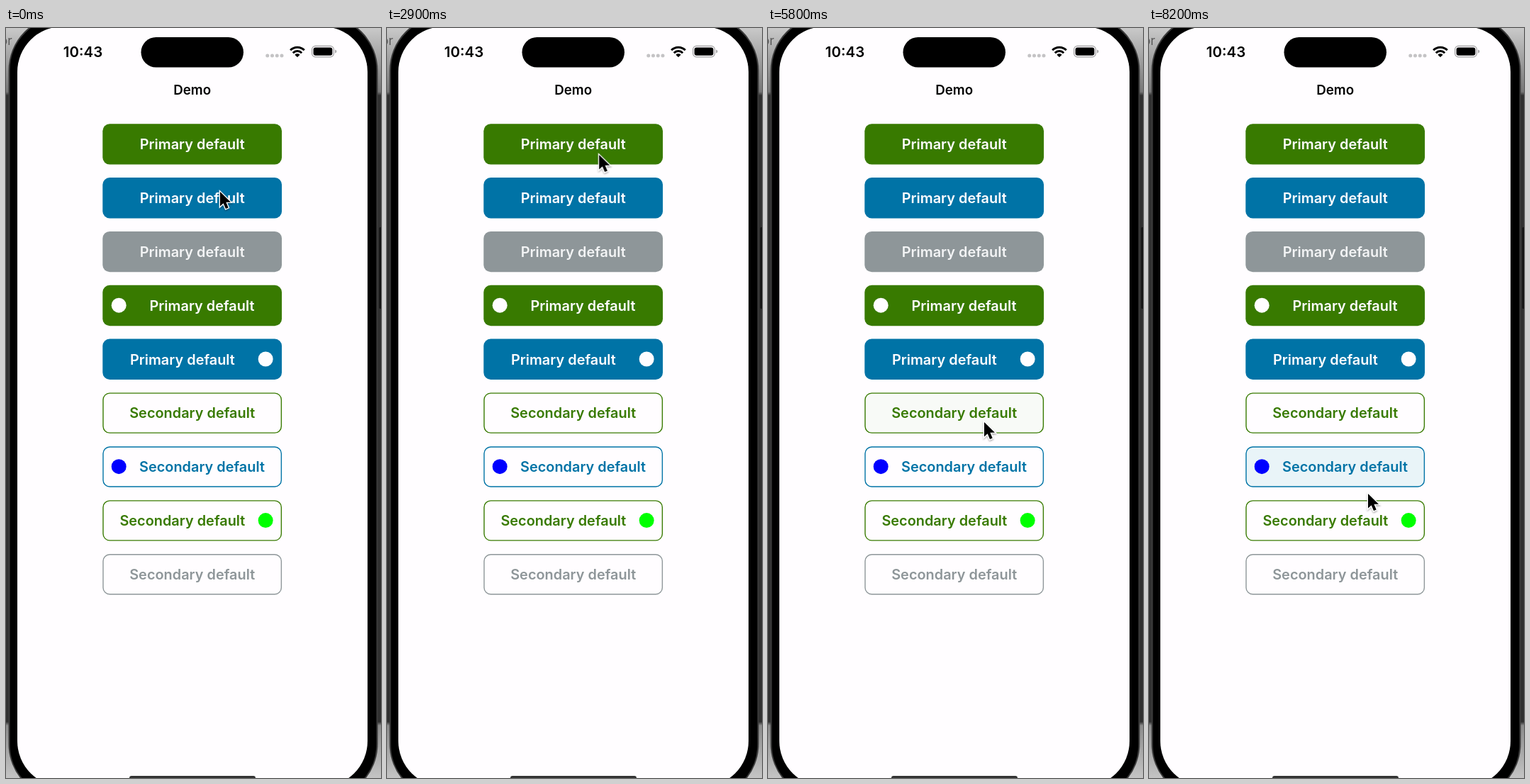
These frames come from a looping animation (529x1058 px, 8300 ms). An HTML page:

```html
<!DOCTYPE html>
<html lang="en">
<head>
<meta charset="utf-8">
<title>Demo</title>
<style>
html, body { margin: 0; width: 100%; height: 100%; overflow: hidden; background: #333; }
svg { display: block; width: 100%; height: 100%; }
text { font-family: Inter, "Open Sans", sans-serif; font-weight: 600; }
.label { font-size: 19.9px; text-anchor: middle; }
.press { opacity: 0; animation: press 8.3s linear infinite; }
.hold { opacity: 0; animation: hold 8.3s linear infinite; }
#cursor { animation: move 8.3s ease-in-out infinite; }

@keyframes press {
  0% { opacity: 0; }
  2.4%, 5.5% { opacity: 1; }
  8.4%, 100% { opacity: 0; }
}
@keyframes hold {
  0%, 90.4% { opacity: 0; }
  92.8%, 100% { opacity: 1; }
}
@keyframes move {
  0% { transform: translate(302px, 231px); }
  10.8%, 18.1% { transform: translate(302px, 243px); }
  25.3%, 33.7% { transform: translate(300px, 171px); }
  41%, 44.6% { transform: translate(287px, 305px); }
  50.6%, 54.2% { transform: translate(292px, 390px); }
  59%, 62.7% { transform: translate(298px, 470px); }
  68.7%, 74.7% { transform: translate(305px, 556px); }
  81.9%, 91.6% { transform: translate(310px, 624px); }
  97.6%, 100% { transform: translate(309px, 657px); }
}
</style>
</head>
<body>
<svg viewBox="0 0 529 1058" preserveAspectRatio="none">
  <defs>
    <linearGradient id="desk" x2="0" y2="1">
      <stop offset="0" stop-color="#c9c9c9"/>
      <stop offset=".085" stop-color="#777"/>
      <stop offset=".09" stop-color="#303030"/>
      <stop offset=".925" stop-color="#303030"/>
      <stop offset=".93" stop-color="#8c8c8c"/>
      <stop offset="1" stop-color="#c4c4c4"/>
    </linearGradient>
    <filter id="soft" x="-50%" y="-50%" width="200%" height="200%">
      <feDropShadow dx="0" dy="1.5" stdDeviation="1.3" flood-opacity=".35"/>
    </filter>
  </defs>

  <!-- phone body -->
  <rect width="529" height="1058" fill="url(#desk)"/>
  <text x="-8" y="24" font-size="17" style="font-weight:400" fill="#555">or</text>
  <rect x="526.5" y="281" width="4" height="115" rx="1.5" fill="#111"/>
  <rect x="4.5" y="-17" width="519" height="1104" rx="77" stroke="#3b3b3b" stroke-width="2"/>
  <rect x="16" y="-2" width="494" height="1072" rx="64" fill="#fffdff"/>

  <!-- status bar -->
  <rect x="190.5" y="13" width="144.5" height="42.5" rx="21.2"/>
  <text x="108.5" y="41.2" font-size="20.5" text-anchor="middle">10:43</text>
  <g fill="#c4c3c5">
    <circle cx="368.8" cy="39" r="2.5"/><circle cx="375.5" cy="39" r="2.5"/>
    <circle cx="382.3" cy="39" r="2.5"/><circle cx="389" cy="39" r="2.5"/>
  </g>
  <g fill="none" stroke="#000" stroke-width="3">
    <path d="M401.2 31.3a13.8 13.8 0 0 1 19.6 0"/>
    <path d="M404.8 35.2a8.7 8.7 0 0 1 12.4 0"/>
  </g>
  <path d="M411 41.3L407.4 37.7a5.1 5.1 0 0 1 7.2 0Z"/>
  <rect x="431.6" y="25.4" width="30.8" height="15.4" rx="4.8" fill="none" stroke="#a09fa1" stroke-width="1.2"/>
  <rect x="433.6" y="27.4" width="26.8" height="11.4" rx="3"/>
  <path d="M464.2 30.5q2.2 .8 2.2 2.6t-2.2 2.6Z" fill="#a09fa1"/>

  <text x="262.7" y="94" font-size="18.8" text-anchor="middle">Demo</text>
  <g id="buttons"></g>
  <rect x="174" y="1055" width="178" height="6" rx="3" fill="#333"/>

  <g id="cursor">
    <path filter="url(#soft)" d="M0 0V20.6L4.7 16.2L8 24L11.7 22.4L8.4 14.8H15Z"
      stroke="#fff" stroke-width="2.6" stroke-linejoin="miter" paint-order="stroke"/>
  </g>
</svg>
<script>
const GREEN = '#387a00', BLUE = '#0073a6', GREY = '#8e9699', WHITE = '#fffdff';
const PRESSED = {
  solid: { [GREEN]: '#285700', [BLUE]: '#005275' },
  outline: { [GREEN]: '#eef5ea', [BLUE]: '#e9f4f8' }
};

// side: -1 icon left, 1 icon right; at: press start in ms
const buttons = [
  { kind: 'solid', color: GREEN, at: 2160 },
  { kind: 'solid', color: BLUE, at: 950 },
  { kind: 'solid', color: GREY },
  { kind: 'solid', color: GREEN, side: -1, icon: WHITE, at: 4220 },
  { kind: 'solid', color: BLUE, side: 1, icon: WHITE, at: 4920 },
  { kind: 'outline', color: GREEN },
  { kind: 'outline', color: BLUE, side: -1, icon: '#0000ff', hold: true },
  { kind: 'outline', color: GREEN, side: 1, icon: '#00ff00' },
  { kind: 'outline', color: GREY }
];
buttons[5].at = 5730;

const box = (y, inset, attrs) =>
  `<rect x="${136.3 + inset}" y="${y + inset}" width="${252.8 - 2 * inset}"
    height="${57.4 - 2 * inset}" rx="${10 - inset}" ${attrs}/>`;

function draw({ kind, color, side = 0, icon, at, hold }, i) {
  const y = 135.2 + i * 75.85, mid = y + 28.7;
  const solid = kind === 'solid';
  const fill = PRESSED[kind][color];
  let out = box(y, 0, `fill="${solid ? color : WHITE}"`);
  if (hold) out += box(y, 0, `class="hold" fill="${fill}"`);
  else if (at) out += box(y, 0, `class="press" style="animation-delay:${at}ms" fill="${fill}"`);
  if (!solid) out += box(y, 0.7, `fill="none" stroke="${color}" stroke-width="1.4"`);
  if (icon) out += `<circle cx="${262.7 + side * 103.5}" cy="${mid - 0.3}" r="10.5" fill="${icon}"/>`;
  const ink = !solid ? color : color === GREY ? '#f3f4f5' : WHITE;
  return out + `<text class="label" x="${262.7 - side * 13.8}" y="${mid + 7.3}" fill="${ink}">${
    solid ? 'Primary' : 'Secondary'} default</text>`;
}

document.getElementById('buttons').innerHTML = buttons.map(draw).join('');
</script>
</body>
</html>
```
